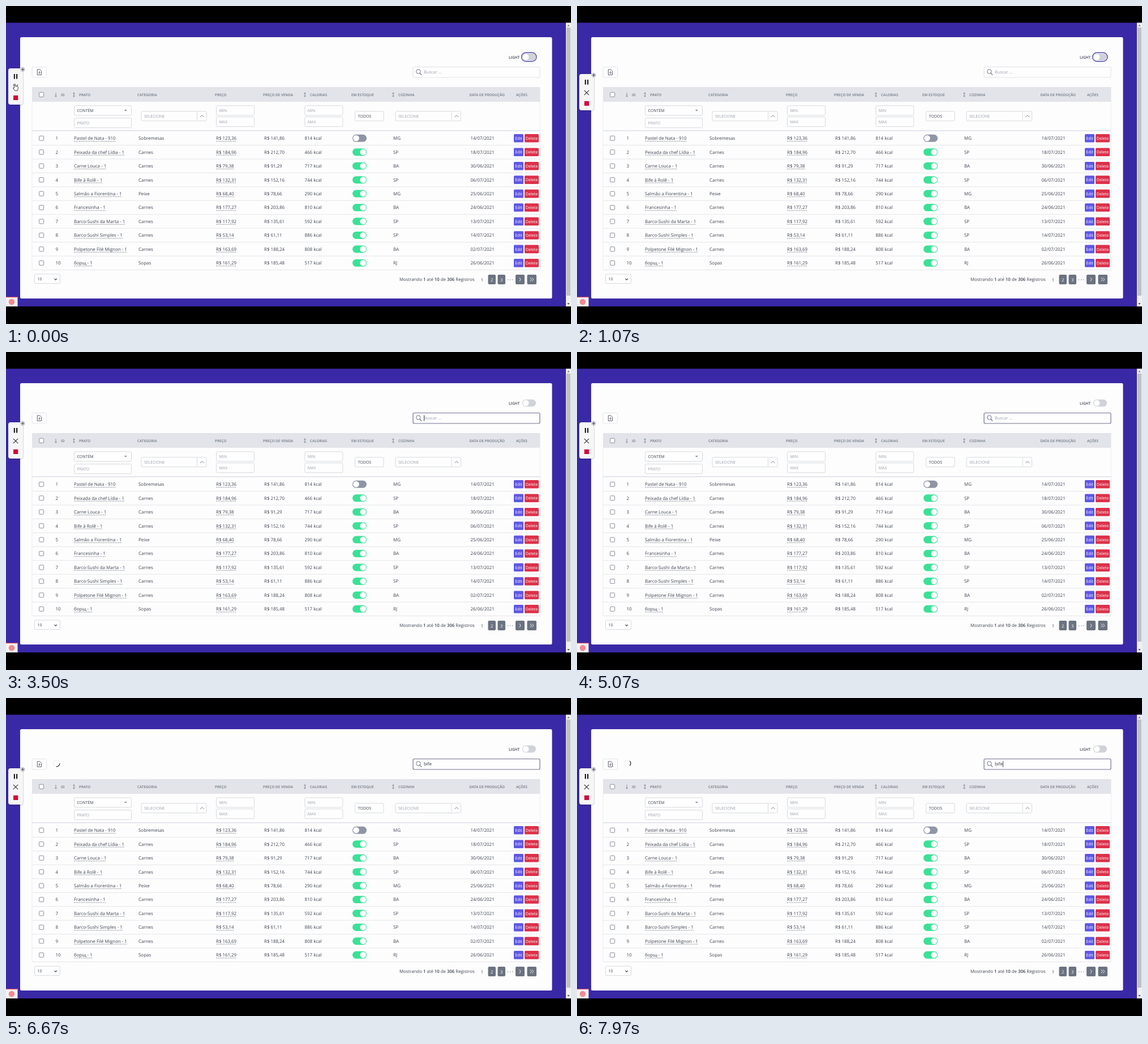
Recreate the animation shown at these times as an HTML page. Size 998 by 561 pixels, loop 8 s.

```html
<!DOCTYPE html>
<html lang="pt-BR">
<head>
<meta charset="utf-8">
<title>Tabela de pratos</title>
<style>
html, body { margin: 0; width: 100%; height: 100%; overflow: hidden; background: #000; }
svg { display: block; width: 998px; height: 561px; }
text { font-family: "Open Sans", "Noto Sans", sans-serif; text-rendering: geometricPrecision; white-space: pre; }
</style>
</head>
<body>
<svg id="stage" viewBox="0 0 998 561" xmlns="http://www.w3.org/2000/svg"></svg>
<script>
const NS = 'http://www.w3.org/2000/svg';
const stage = document.getElementById('stage');
const LOOP = 8000;
const INK = '#3d4350', MUTED = '#9a9fab', LINE = '#d3d5dc', SLATE = '#6b7280';

function add(tag, attrs, parent = stage) {
  const el = document.createElementNS(NS, tag);
  for (const key in attrs) el.setAttribute(key, attrs[key]);
  parent.appendChild(el);
  return el;
}
const group = (parent) => add('g', {}, parent);
const rect = (x, y, width, height, fill, rx = 0, more = {}, parent) =>
  add('rect', { x, y, width, height, fill, rx, ...more }, parent);
const circle = (cx, cy, r, fill, parent) => add('circle', { cx, cy, r, fill }, parent);
const stroke = (d, color, width = 1, more = {}, parent) =>
  add('path', { d, fill: 'none', stroke: color, 'stroke-width': width, ...more }, parent);

function text(x, y, str, size = 7.95, fill = INK, weight = 400, more = {}) {
  const el = add('text', { x, y, 'font-size': size, fill, 'font-weight': weight, ...more });
  el.textContent = str;
  return el;
}
const box = (x, y, w, h, color = LINE, rx = 2) =>
  rect(x + .5, y + .5, w - 1, h - 1, '#fefefe', rx, { stroke: color, 'stroke-width': .9 });

function toggle(x, y, on, color) {
  rect(x, y, 25, 13, color, 6.5);
  circle(on ? x + 18.7 : x + 6.5, y + 6.5, 5.3, '#fff');
}
function underlined(x, y, str) {
  const w = text(x, y, str).getComputedTextLength();
  stroke(`M${x} ${y + 2.4}h${w}`, '#777c87', .8, { 'stroke-dasharray': '2 1' });
}
function checkbox(y) {
  rect(58.6, y - 4, 8, 8, '#fff', 1.5, { stroke: '#7d828e', 'stroke-width': .9 });
}
function sortIcon(x, both) {
  stroke(`M${x} 153v7M${x - 1.6} 158.4l1.6 1.8l1.6-1.8`, SLATE, .8);
  if (both) stroke(`M${x - 1.6} 154.6l1.6-1.8l1.6 1.8`, SLATE, .8);
}

// Page
rect(0, 0, 998, 561, '#000');
rect(0, 29.5, 998, 500.5, '#3a29a6');
rect(25, 55, 939.5, 461, '#fdfdfd', 2.5);

// Scrollbar
rect(989, 29.5, 9, 500.5, '#f1f1f1');
rect(990, 38, 7, 473, '#c1c1c1');
add('path', { d: 'M991.3 35.5l2.2-2.8l2.2 2.8z', fill: '#777' });
add('path', { d: 'M991.3 524l2.2 2.8l2.2-2.8z', fill: '#505050' });

// Theme switch
text(888, 93, 'LIGHT', 6.7, INK, 600);
rect(912, 83.7, 24, 12.6, '#d0d2d9', 6.3);
circle(918.3, 90, 5.2, '#fff');
const ring = rect(910.6, 82.2, 26.4, 15.6, 'none', 7.8, { stroke: '#564cae', 'stroke-width': 1.4 });

// Export button
box(45.5, 107, 26.5, 19.5, '#dfe1e6');
stroke('M55.3 112h4.4l2.8 2.8v6.7h-7.2zM59 114.6v4.4M57.2 117.4l1.8 1.8l1.8-1.8', '#4a4f5b', .9);

// Loader
const loader = group();
add('circle', { cx: 89, cy: 115.3, r: 5.9, fill: 'none', stroke: '#eeeff3', 'stroke-width': 1.1 }, loader);
const arc = stroke('M84.83 111.13A5.9 5.9 0 0 1 93.17 111.13', '#222', 1.2, {}, loader);

// Search
const search = box(718.5, 107, 225, 19.5, '#dcdee4');
circle(728.3, 115.6, 3.7, 'none').setAttribute('stroke', SLATE);
stroke('M731 118.5l3.2 3.3', SLATE, 1.2);
const hint = text(738, 119.4, 'Buscar ...', 7.4, MUTED);
const query = text(738, 119.4, '', 7.95, '#2f343f');
const caret = rect(738, 111.2, .8, 10.8, '#222');

// Table head
rect(46, 143, 897.5, 26, '#e2e4e9');
checkbox(156.3);
const heads = [[97, 'ID'], [129, 'PRATO'], [232, 'CATEGORIA'], [369, 'PREÇO'], [454, 'PREÇO DE VENDA'],
  [537, 'CALORIAS'], [610, 'EM ESTOQUE'], [693, 'COZINHA'], [818.5, 'DATA DE PRODUÇÃO'], [901, 'AÇÕES']];
for (const [x, label] of heads) text(x, 158.7, label, 6.2, SLATE, 600, { 'letter-spacing': .1 });
sortIcon(88, false);
[120, 528, 684].forEach((x) => sortIcon(x, true));

// Filters
function field(x, y, w, label, color = MUTED) {
  box(x, y, w, 18, LINE);
  text(x + 5.5, y + 11.6, label, 7, color);
}
function combo(x, w) {
  field(x, 185.3, w, 'SELECIONE');
  stroke(`M${x + w - 17} 187v14.5`, LINE, .9);
  stroke(`M${x + w - 11.5} 196l3.3-3.3l3.3 3.3`, SLATE, .9);
}
field(120, 175.4, 102, 'CONTÉM', INK);
add('path', { d: 'M208.8 183l2.5 2.8l2.5-2.8z', fill: '#8b909c' });
field(120, 197.2, 102, 'PRATO');
combo(238.5, 116);
for (const x of [371, 527.3]) {
  field(x, 175.4, 68, 'MIN');
  field(x, 195.2, 68, 'MAX');
}
field(616, 185.3, 51.5, 'TODOS', INK);
combo(687.5, 116.5);

// Rows: dish, category, price, kcal, kitchen, date
const rows = [
  ['Pastel de Nata - 910', 'Sobremesas', 123.36, 814, 'MG', '14/07'],
  ['Peixada da chef Lídia - 1', 'Carnes', 184.96, 466, 'SP', '18/07'],
  ['Carne Louca - 1', 'Carnes', 79.38, 717, 'BA', '30/06'],
  ['Bife à Rolê - 1', 'Carnes', 132.31, 744, 'SP', '06/07'],
  ['Salmão a Fiorentina - 1', 'Peixe', 68.40, 290, 'MG', '25/06'],
  ['Francesinha - 1', 'Carnes', 177.27, 810, 'BA', '24/06'],
  ['Barco-Sushi da Marta - 1', 'Carnes', 117.92, 592, 'SP', '13/07'],
  ['Barco-Sushi Simples - 1', 'Carnes', 53.14, 886, 'SP', '14/07'],
  ['Polpetone Filé Mignon - 1', 'Carnes', 163.69, 808, 'BA', '02/07'],
  ['борщ - 1', 'Sopas', 161.29, 517, 'RJ', '26/06']
];
const money = (v) => 'R$ ' + v.toFixed(2).replace('.', ',');
const STEP = 24.45;

rect(46, 219, 897.5, 2, '#e5e5f1');
rows.forEach(([dish, kind, price, kcal, kitchen, date], i) => {
  const mid = 233.3 + i * STEP, y = mid + 2.9;
  stroke(`M46 ${mid + 12.2}h897.5`, '#e3e4ea', .9);
  checkbox(mid);
  text(87.5, y, i + 1);
  underlined(120, y, dish);
  text(234, y, kind);
  underlined(371, y, money(price));
  text(456, y, money(price * 1.15));
  text(527.5, y, kcal + ' kcal');
  toggle(612, mid - 6.5, i > 0, i ? '#3be196' : '#8f95a3');
  text(684, y, kitchen);
  text(820.5, y, date + '/2021');
  rect(897, mid - 7.3, 17, 14.6, '#5f57e3', 1.5);
  text(905.5, y - .2, 'Edit', 7.1, '#fff', 400, { 'text-anchor': 'middle' });
  rect(916, mid - 7.3, 25, 14.6, '#dc3049', 1.5);
  text(928.5, y - .2, 'Delete', 7.1, '#fff', 400, { 'text-anchor': 'middle' });
});
stroke('M46 169V465.5M943.3 169V465.5', '#e8e9ee', .8);

// Footer
box(50, 472.5, 46, 17.5, LINE);
text(55.5, 484, '10', 6.8);
stroke('M85.4 480.9l2.3 2.3l2.3-2.3', INK, 1.1);
const total = text(695, 485.3, '', 7.8);
'Mostrando |1| até |10| de |306| Registros'.split('|').forEach((part, i) => {
  add('tspan', { 'font-weight': i % 2 ? 600 : 400 }, total).textContent = part;
});
text(841, 485.5, '1', 7.6, INK, 400, { 'text-anchor': 'middle' });
for (const [x, w, label] of [[851.5, 13.5, '2'], [868.5, 13.5, '3'], [900, 16, ''], [920.5, 16.5, '']]) {
  rect(x, 474, w, 17, SLATE, 2);
  text(x + w / 2, 485.5, label, 7.6, '#fff', 400, { 'text-anchor': 'middle' });
}
for (const x of [886.7, 890.7, 894.7]) circle(x, 483, .7, SLATE);
stroke('M907 479.3l2 3.2l-2 3.2', '#fff', .9);
stroke('M925.8 479.3l2.6 3.2l-2.6 3.2M929.2 479.3l2.6 3.2l-2.6 3.2', '#fff', .9);

// Corner badge
rect(0, 513.5, 20.5, 16.5, '#f6f1f3');
rect(0, 513, 20.5, 1.2, '#e0576b');
circle(10, 522, 5.3, '#ef8b90');

// Recorder panel
const panel = group();
rect(2.8, 109.3, 28.4, 66.4, '#000', 5, { opacity: .12 }, panel);
rect(4, 110, 26, 64, '#f6f6f6', 4, {}, panel);
rect(13.8, 120, 2.2, 8.6, '#222', 0, {}, panel);
rect(18, 120, 2.2, 8.6, '#222', 0, {}, panel);
stroke('M12.8 138.8l8.4 8.4M21.2 138.8l-8.4 8.4', '#333', 1.1, {}, panel);
rect(13, 157.8, 8.2, 8.2, '#d4063a', 0, {}, panel);
circle(29.5, 112, 4.2, '#cfd0d6', panel);
stroke('M27 112h5M29.5 109.5v5', '#4a4b55', 1, {}, panel);

// Hand pointer, origin at its centre
const hand = add('path', {
  d: 'M-2.4 -5.6q1-.9 1.8 0v3.6q1.2-.7 1.8.2q1.2-.5 1.7.4q1.2-.2 1.4.9v2.6q-.2 1.6-1 2.4v1.4h-4.6q-1-2.4-3-4.4q-.3-1.4 1-1.2l.9.8z',
  fill: '#fff', stroke: '#222', 'stroke-width': .8, 'stroke-linejoin': 'round'
});

const FOCUS = 2430, LOAD = 6100, BLINK = 527, KEYS = [5300, 5470, 5630, 5730];
const lerp = (a, b, k) => a + (b - a) * k;
const span = (t, from, to) => Math.min(1, Math.max(0, (t - from) / (to - from)));
const smooth = (k) => k * k * (3 - 2 * k);
const show = (el, on) => el.setAttribute('visibility', on ? 'visible' : 'hidden');

function draw(t) {
  // pointer leaves the panel through the left edge
  const a = smooth(span(t, 70, 330)), b = smooth(span(t, 430, 700));
  const hx = lerp(lerp(17, 12, a), -8, b), hy = lerp(lerp(143.5, 135, a), 131, b);
  hand.setAttribute('transform', `translate(${hx} ${hy})`);

  const drop = 14 * (1 - Math.pow(1 - span(t, 850, 1230), 1.4));
  panel.setAttribute('transform', `translate(0 ${Math.round(drop)})`);

  const focused = t >= FOCUS;
  show(ring, !focused);
  search.setAttribute('stroke', focused ? '#70748f' : '#dcdee4');
  search.setAttribute('stroke-width', focused ? 1.2 : .9);

  const typed = KEYS.filter((k) => t >= k).length;
  query.textContent = 'bife'.slice(0, typed);
  show(hint, !typed);
  const since = t - (typed ? KEYS[typed - 1] : FOCUS);
  show(caret, focused && Math.floor(since / BLINK) % 2 === 0);
  caret.setAttribute('x', 738 + (typed ? query.getComputedTextLength() : 0));

  show(loader, t >= LOAD);
  arc.setAttribute('transform', `rotate(${(t - LOAD) * 360 / 1500} 89 115.3)`);
}

const start = performance.now();
function frame() {
  draw((performance.now() - start) % LOOP);
  requestAnimationFrame(frame);
}
frame();
</script>
</body>
</html>
```
